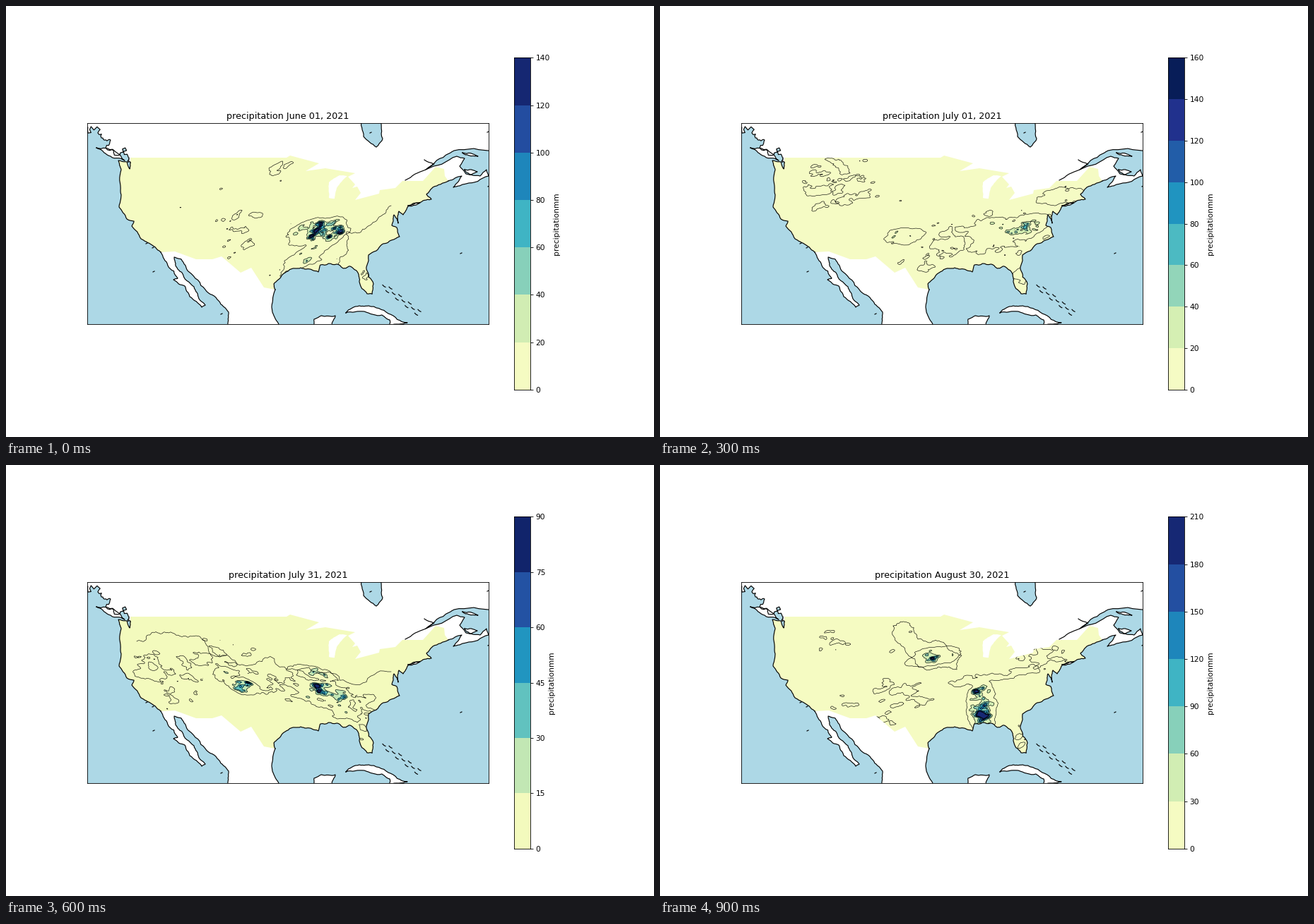
Animation, 917 px wide and 611 px high, one loop 1 s. Source, as a matplotlib script:

```python
import numpy as np
import matplotlib.pyplot as plt
from matplotlib.animation import FuncAnimation
from matplotlib.patches import Polygon
from matplotlib.ticker import MaxNLocator

W, H, DPI = 917, 611, 72
K = W / 12 / DPI  # scale of a 12 inch wide layout
plt.rcParams.update({
    "font.family": "DejaVu Sans", "font.size": 10 * K, "axes.linewidth": 0.8 * K,
    "axes.labelpad": 4 * K, "axes.titlepad": 6 * K, "ytick.major.size": 3.5 * K,
    "ytick.major.pad": 3.5 * K, "ytick.major.width": 0.8 * K,
})

# Key points of the coasts, in stage pixels
CANADA_WEST = [(112, 171), (135, 187), (150, 203), (173, 214), (176, 222)]
PACIFIC = [(176, 222), (175, 231), (171, 221), (159, 219), (163, 232), (162, 262),
           (160, 285), (171, 302), (181, 305), (178, 312), (191, 330), (202, 336),
           (219, 349)]
BAJA = [(219, 349), (229, 368), (243, 386), (237, 388), (253, 397), (260, 412), (277, 427),
        (282, 424), (273, 415), (266, 398), (249, 378), (240, 368), (238, 356), (248, 359),
        (259, 377), (282, 402), (301, 418), (315, 434), (314, 453)]
MEXICAN_GULF = [(387, 453), (377, 434), (376, 426), (381, 402)]
GULF = [(381, 402), (379, 394), (391, 381), (409, 372), (425, 373), (442, 377), (445, 367),
        (468, 366), (478, 372), (487, 369), (498, 378), (500, 391), (511, 408), (518, 408)]
ATLANTIC = [(518, 408), (520, 394), (510, 373), (513, 353), (532, 338), (549, 331),
            (557, 327), (553, 314), (546, 311), (549, 296), (555, 308), (556, 291),
            (562, 296), (569, 284), (590, 276), (602, 274), (595, 267), (604, 257),
            (626, 248)]
MARITIMES = [(626, 248), (645, 241), (633, 257), (651, 252), (683, 241), (680, 232),
             (671, 241), (651, 238), (642, 227), (649, 216), (638, 213), (594, 232),
             (627, 209), (634, 205), (690, 206)]

CUBA = [(481, 435), (500, 425), (513, 425), (541, 436), (568, 449), (543, 453), (543, 445),
        (532, 438), (507, 433)]
YUCATAN = [(436, 453), (436, 444), (446, 439), (466, 439), (461, 453)]
VANCOUVER = [(128, 201), (153, 205), (168, 219), (145, 212)]
ANTICOSTI = [(646, 208), (668, 213), (656, 212)]
PRINCE_EDWARD = [(649, 232), (667, 235), (657, 239)]
LONG_ISLAND = [(569, 283), (586, 279), (580, 282)]
BAY = [(501, 160), (506, 185), (524, 200), (533, 188), (528, 160)]
SPECKS = [(199, 337), (208, 343), (209, 377), (305, 437), (644, 351), (683, 256), (682, 179),
          (516, 180)]
RIVER = [(565, 247), (594, 232), (606, 224), (592, 218)]

NORTH_BORDER = [(176, 215), (397, 215), (402, 212), (443, 223), (424, 234), (452, 230),
                (494, 237), (484, 242), (494, 253), (490, 258), (497, 256), (502, 265),
                (494, 275), (528, 266), (529, 261), (551, 258), (561, 248), (590, 248),
                (608, 228), (620, 231), (621, 241)]
SOUTH_BORDER = [(365, 399), (347, 371), (332, 378), (305, 355), (292, 359), (269, 359),
                (239, 348)]
LAKE = [(457, 272), (457, 250), (472, 240), (483, 241), (468, 258), (465, 273)]

# Rain areas: x, y, half length, half width, typical mm
ALWAYS = [(508, 386, 10, 16, 0.8), (280, 250, 85, 32, 0.1)]
JUNE_01 = [(330, 305, 32, 46, 0.7), (430, 320, 25, 12, 36), (460, 318, 17, 13, 28),
           (425, 354, 28, 12, 9), (385, 237, 40, 13, 0.7), (430, 340, 65, 34, 0.5)]
JUNE_21 = [(470, 322, 75, 18, 2), (515, 292, 15, 7, 28), (385, 362, 36, 11, 6),
           (465, 362, 26, 6, 16), (430, 232, 30, 14, 0.8), (325, 308, 22, 12, 0.8)]
JULY_01 = [(240, 262, 46, 46, 0.5), (345, 326, 24, 9, 24), (510, 311, 46, 11, 18),
           (450, 322, 100, 26, 1.2), (575, 269, 36, 12, 2), (430, 352, 95, 24, 0.5)]
JULY_21 = [(270, 250, 45, 35, 0.35), (388, 240, 42, 24, 0.65), (555, 275, 40, 22, 0.8),
           (460, 350, 64, 22, 0.9), (378, 372, 30, 20, 0.9), (285, 335, 50, 16, 0.3)]
JULY_31 = [(225, 300, 52, 45, 0.35), (338, 314, 22, 8, 9), (440, 294, 22, 6, 20),
           (455, 320, 25, 8, 22), (400, 312, 140, 24, 0.8), (485, 350, 62, 20, 0.5)]
AUGUST_20 = [(395, 228, 15, 14, 1.5), (356, 217, 10, 4, 60), (405, 266, 9, 4, 60),
             (405, 302, 18, 5, 45), (457, 319, 8, 5, 80), (315, 285, 48, 26, 0.4),
             (500, 320, 80, 45, 0.3)]
AUGUST_30 = [(387, 272, 32, 10, 20), (455, 341, 15, 25, 75), (460, 302, 48, 9, 2.5),
             (540, 275, 52, 16, 0.9), (340, 335, 58, 30, 0.5), (250, 335, 36, 12, 0.5)]


def drift(storms, dx, dy=0):
    return [(x + dx, y + dy, *rest) for x, y, *rest in storms]


DATES = [JUNE_01, drift(JUNE_01, 25), JUNE_21, JULY_01, drift(JULY_01, 10, 15), JULY_21,
         JULY_31, drift(JULY_31, 20, -10), AUGUST_20, AUGUST_30]
PEAKS = [138, 155, 197, 146, 133, 157, 86, 150, 292, 208]
TILTS = [25, 20, 18, 8, 0, 0, -15, -15, -15, 10]

# Long single outlines, by index of the date
FRONTS = {
    0: [(470, 368), (482, 320), (545, 283)],
    2: [(360, 312), (420, 300), (470, 296), (560, 264)],
    5: [(275, 235), (237, 285), (262, 322), (318, 295), (345, 262)],
    6: [(185, 250), (230, 238), (310, 270), (400, 290), (545, 293)],
    8: [(176, 250), (215, 228), (255, 262), (282, 285), (320, 264), (355, 287), (435, 292),
        (460, 308), (548, 330)],
    9: [(330, 228), (345, 222), (365, 247), (427, 270), (420, 290), (390, 288), (330, 228)],
}

X, Y = np.meshgrid(np.arange(156, 634, 0.7), np.arange(208, 413, 0.7))


def rough(points, amp=0.1, depth=3):
    """Wrinkle a polyline by moving the middle of each segment sideways."""
    rng = np.random.default_rng(len(points))
    pts = np.array(points, float)
    for _ in range(depth):
        step = np.diff(pts, axis=0)
        side = step[:, ::-1] * (1, -1)
        out = np.empty((2 * len(pts) - 1, 2))
        out[::2] = pts
        out[1::2] = pts[:-1] + step / 2 + rng.uniform(-amp, amp, (len(step), 1)) * side
        pts = out
    return pts


def rotate(dx, dy, tilt):
    c, s = np.cos(np.radians(tilt)), np.sin(np.radians(tilt))
    return dx * c - dy * s, dx * s + dy * c


def streaky_noise(seed, tilt, size=6, stretch=1.4):
    white = np.random.default_rng(seed).normal(size=X.shape)
    ky, kx = (2 * np.pi * np.fft.fftfreq(n, 0.7) for n in X.shape)
    u, v = rotate(kx[None, :], ky[:, None], tilt)
    k2 = (u * stretch) ** 2 + (v / stretch) ** 2
    spectrum = (1 + k2 * size ** 2) ** -0.9 * np.exp(-k2 * 0.3)
    noise = np.fft.ifft2(np.fft.fft2(white) * spectrum).real
    return noise / noise.std()


def rainfall(i):
    amount = np.full(X.shape, 0.03)
    for x, y, rx, ry, mm in ALWAYS + DATES[i]:
        # only storms longer than wide lean with the wind
        u, v = rotate(X - x, Y - y, TILTS[i] if rx > ry else 0)
        amount += mm * np.exp(-((u / rx) ** 2 + (v / ry) ** 2) ** 2)
    return amount * np.exp(0.95 * streaky_noise(i + 11, TILTS[i]))


def date_text(day):
    for month, days in (("June", 30), ("July", 31), ("August", 31)):
        if day < days:
            return f"{month} {day + 1:02d}, 2021"
        day -= days


fig = plt.figure(figsize=(W / DPI, H / DPI), dpi=DPI, facecolor="white")
map_height = 0.62 * W / 2 / H
ax = fig.add_axes([0.125, 0.495 - map_height / 2, 0.62, map_height], facecolor="lightblue")
ax.set(xlim=(114.6, 683.2), ylim=(450.7, 166.4), xticks=[], yticks=[])
cax = fig.add_axes([718.7 / W, 0.11, 23.5 / W, 0.77])


def coast(points):
    ax.plot(*np.transpose(points), color="black", lw=1.15, zorder=5)


def area(points, color, zorder):
    return ax.add_patch(Polygon(points, fc=color, ec="none", zorder=zorder))


pacific, gulf, atlantic = rough(PACIFIC, 0.07), rough(GULF, 0.12), rough(ATLANTIC, 0.1)
mainland = [rough(CANADA_WEST, 0.55, 4), pacific, rough(BAJA), rough(MEXICAN_GULF, 0.04),
            gulf, atlantic, rough(MARITIMES, 0.07)]
area(np.vstack(mainland + [[(690, 160), (110, 160)]]), "white", 0.5)
for shore in mainland:
    coast(shore)
for island in (CUBA, YUCATAN, VANCOUVER, ANTICOSTI, PRINCE_EDWARD, LONG_ISLAND, BAY):
    outline = rough(island + island[:1])
    area(outline, "lightblue" if island is BAY else "white", 0.6)
    coast(outline)
coast(rough(RIVER, 0.05))
for x, y in SPECKS:
    coast([(x - 1, y), (x + 1, y - 1)])
# Bahamas: short dashes along a diagonal
for t in np.linspace(0, 1, 12):
    x, y = 535 + 50 * t, 397 + 39 * t + 5 * np.sin(23 * t)
    coast([(x - 2, y - 1.5), (x, y + 0.5), (x + 2, y + 1.5)])

country = area(np.vstack([NORTH_BORDER, atlantic[::-1], gulf[::-1], SOUTH_BORDER,
                          pacific[::-1]]), "white", 1)
area(rough(LAKE + LAKE[:1], 0.06), "white", 4)
rain_artists = []


def draw(i):
    while rain_artists:
        rain_artists.pop().remove()
    levels = MaxNLocator(8, min_n_ticks=1).tick_values(0, PEAKS[i])
    step = levels[1]
    colors = plt.get_cmap("YlGnBu")((levels[:-1] + step / 2) / PEAKS[i])

    rain = np.minimum(rainfall(i), PEAKS[i])
    country.set_facecolor(colors[0])
    rain_artists.append(ax.contourf(X, Y, rain, levels=levels[1:], colors=colors[1:],
                                    zorder=2))
    rain_artists.append(ax.contour(X, Y, rain, levels=[1, *levels[1:-1]], colors="black",
                                   linewidths=0.6, zorder=3))
    if i in FRONTS:
        rain_artists.extend(ax.plot(*rough(FRONTS[i], 0.22, 5).T, color="black", lw=0.6,
                                    zorder=3))
    for artist in rain_artists:
        artist.set_clip_path(country)
    ax.set_title("precipitation " + date_text(10 * i))

    cax.clear()
    cax.bar(0.5, step, width=1, bottom=levels[:-1], color=colors)
    cax.set(xlim=(0, 1), ylim=(0, levels[-1]), xticks=[], yticks=levels)
    cax.yaxis.set_major_formatter("{x:.0f}")
    cax.yaxis.tick_right()
    cax.yaxis.set_label_position("right")
    cax.set_ylabel("precipitationmm")


anim = FuncAnimation(fig, draw, frames=10, interval=100, init_func=lambda: None,
                     repeat=True, repeat_delay=0)
plt.show()
```
